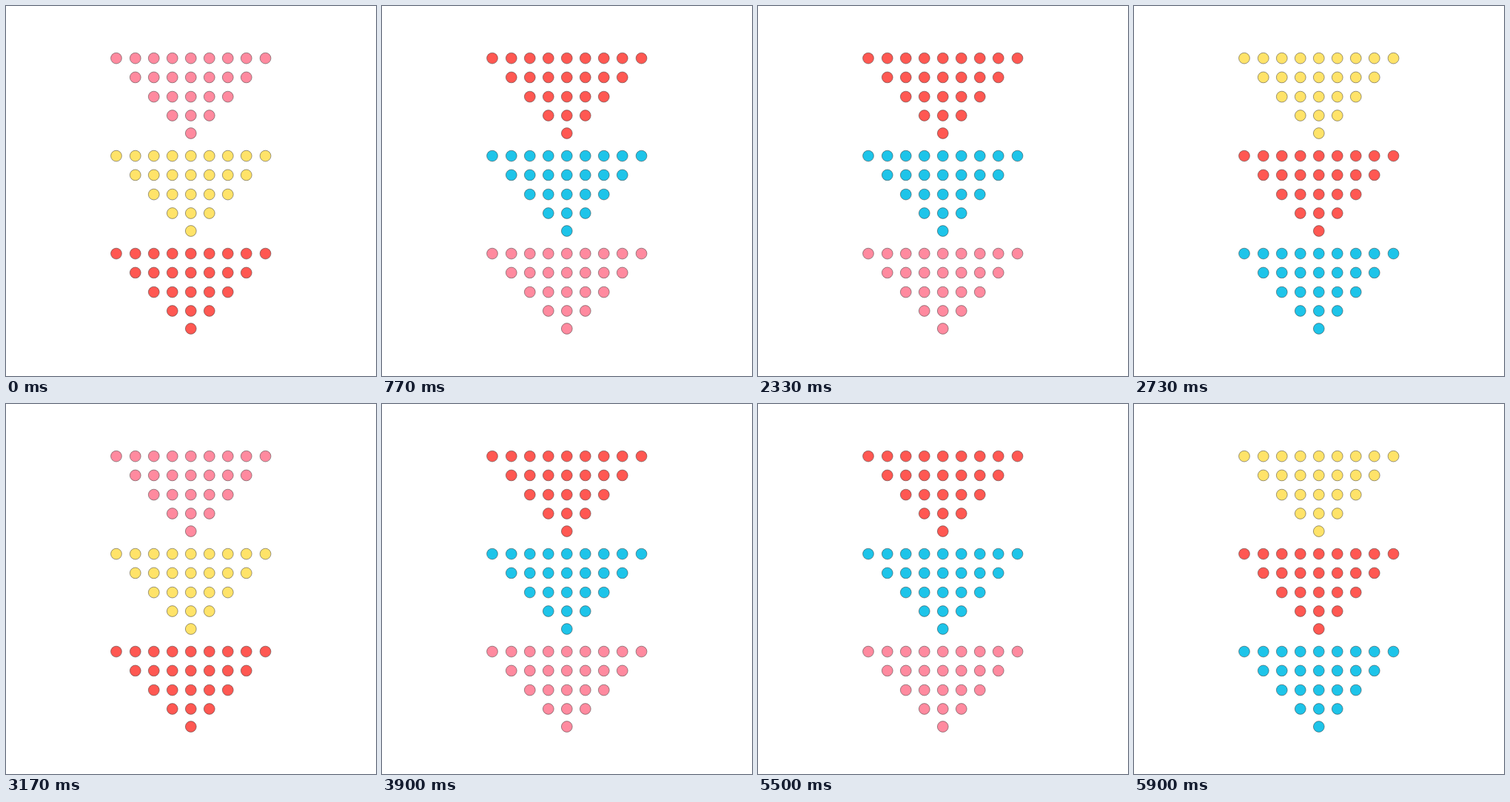
Animation, 500 px wide and 500 px high, one loop 6230 ms. Source, as an HTML page:

```html
<!DOCTYPE html>
<html lang="en">
<head>
<meta charset="utf-8">
<title>Dotted arrows</title>
<style>
  html, body { margin: 0; height: 100%; overflow: hidden; background: #fff; }
  svg { display: block; width: 100vw; height: 100vh; }
  circle { stroke: #333; stroke-width: .5; }
</style>
</head>
<body>
<svg viewBox="0 0 500 500"></svg>
<script>
const LOOP = 6230;
const STEPS = [0, 370, 770, 1170, 1600, 1930, 2330, 2730, 3170, 3500, 3900, 4300, 4730, 5100, 5500, 5900];
const COLORS = ['#ff8a9f', '#1ec4e9', '#ff5852', '#ffe369'];
const ROWS = [70.6, 96.4, 122.6, 148, 172];
const svg = document.querySelector('svg');

function add(parent, name, attrs = {}) {
  const el = document.createElementNS('http://www.w3.org/2000/svg', name);
  for (const key in attrs) el.setAttribute(key, attrs[key]);
  return parent.appendChild(el);
}

const arrows = [0, 1, 2].map(i => {
  const arrow = add(svg, 'g', { transform: `translate(0 ${i * 132})` });
  ROWS.forEach((cy, row) => {
    const half = 4 - row;
    for (let col = -half; col <= half; col++) {
      // the outermost dots sit slightly wider than the grid
      const cx = 249.8 + col * (row === 0 && Math.abs(col) === 4 ? 25.2 : 25);
      add(arrow, 'circle', { cx, cy, r: 7.4 });
    }
  });
  return arrow;
});

// each colour moves down one arrow per step
const start = performance.now();
function draw(now) {
  const t = Math.max(0, now - start) % LOOP;
  const step = STEPS.findLastIndex(s => s <= t);
  arrows.forEach((arrow, i) => arrow.setAttribute('fill', COLORS[(step - i + 4) % 4]));
  requestAnimationFrame(draw);
}
draw(start);
</script>
</body>
</html>
```
